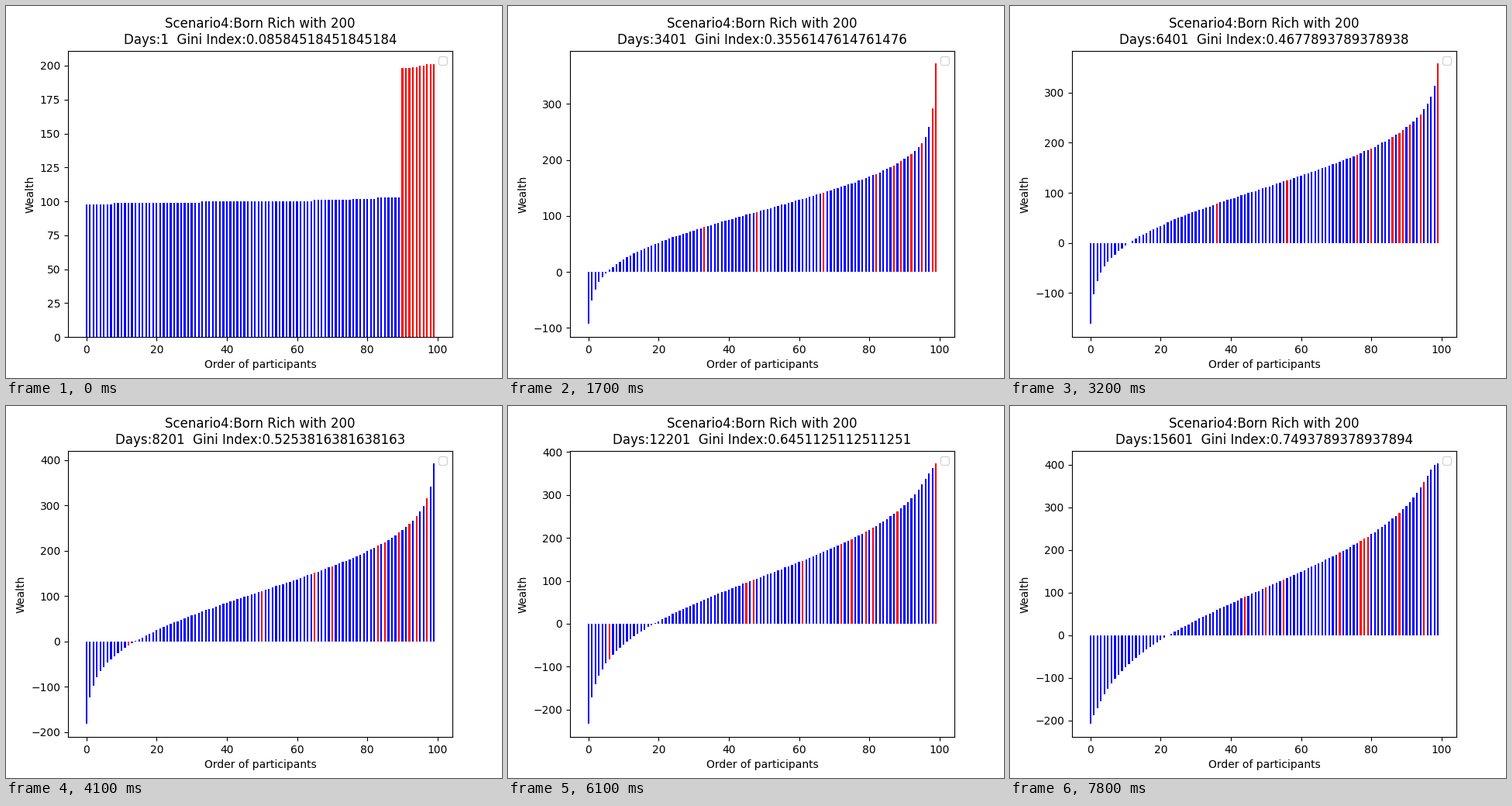
These frames come from a looping animation (640 px wide and 480 px high, 7.9 s). A matplotlib script:

```python
import numpy as np
import matplotlib.pyplot as plt
from matplotlib.animation import FuncAnimation

FRAMES, PEOPLE, RICH = 79, 100, 10
DAYS_PER_STEP = 200
TOTAL = 11000
MEAN = TOTAL / PEOPLE
MIXED = 10  # step at which the starting groups have blended

# Key points: rank-weighted wealth sum, then poorest and richest once mixed
KEYS = [0, MIXED, 23, 32, 50, 61, 78]
SPREAD = np.array([95374, 317490, 451098, 519714, 641332, 716720, 832560])
LOW = [-29, -148, -162, -201, -234, -208]
HIGH = [363, 379, 358, 425, 373, 402]

rank = np.arange(PEOPLE)
p = (rank + 0.5) / PEOPLE
z = 4.91 * (p ** 0.14 - (1 - p) ** 0.14)  # normal quantiles

# The first day: small steps around 100, and around 200 for the rich
start = np.where(rank < PEOPLE - RICH,
                 98 + np.searchsorted([8, 33, 65, 76, 83], rank, "right"),
                 198 + np.searchsorted([93, 95, 97], rank, "right"))

# Each person's wealth wanders; this decides who holds which rank
rng = np.random.default_rng(4)
moves = rng.normal(0, np.sqrt(DAYS_PER_STEP), (FRAMES, PEOPLE))
moves[0] = start
is_rich = np.argsort(np.cumsum(moves, axis=0), axis=1) >= PEOPLE - RICH


def spread_at(i):
    """The squared spread grows linearly, as in a random walk."""
    return np.sqrt(np.interp(i, KEYS, SPREAD ** 2.0))


def bell(i):
    """Sorted normal wealth, with both tails drawn to the extremes."""
    body = MEAN + z * spread_at(i) * np.sqrt(np.pi) / PEOPLE ** 2
    low = np.interp(i, KEYS[1:], LOW)
    high = np.interp(i, KEYS[1:], HIGH)
    return (body + (low - body[0]) * np.exp(-rank)
            + (high - body[-1]) * np.exp(-rank[::-1]))


def wealth(i):
    mix = min(1, np.sqrt(i / MIXED))
    return np.rint((1 - mix) * start + mix * bell(max(i, MIXED)))


fig, ax = plt.subplots(figsize=(6.4, 4.8), dpi=100)
bars = ax.bar(rank, start, width=0.5, color="b")
ax.set_xlabel("Order of participants")
ax.set_ylabel("Wealth")
ax.legend([], [], loc="upper right")


def update(i):
    heights = wealth(i)
    for bar, height, rich in zip(bars, heights, is_rich[i]):
        bar.set_height(height)
        bar.set_facecolor("r" if rich else "b")
    low, high = min(0, heights[0]), heights[-1]
    pad = 0.05 * (high - low)
    ax.set_ylim(low - pad if low < 0 else 0, high + pad)
    gini = float(np.rint(spread_at(i)) / ((PEOPLE + 1) * TOTAL))
    ax.set_title("Scenario4:Born Rich with 200\n"
                 f"Days:{DAYS_PER_STEP * i + 1}  Gini Index:{gini}")
    return bars


anim = FuncAnimation(fig, update, frames=FRAMES, interval=100, repeat=True)
plt.show()
```
